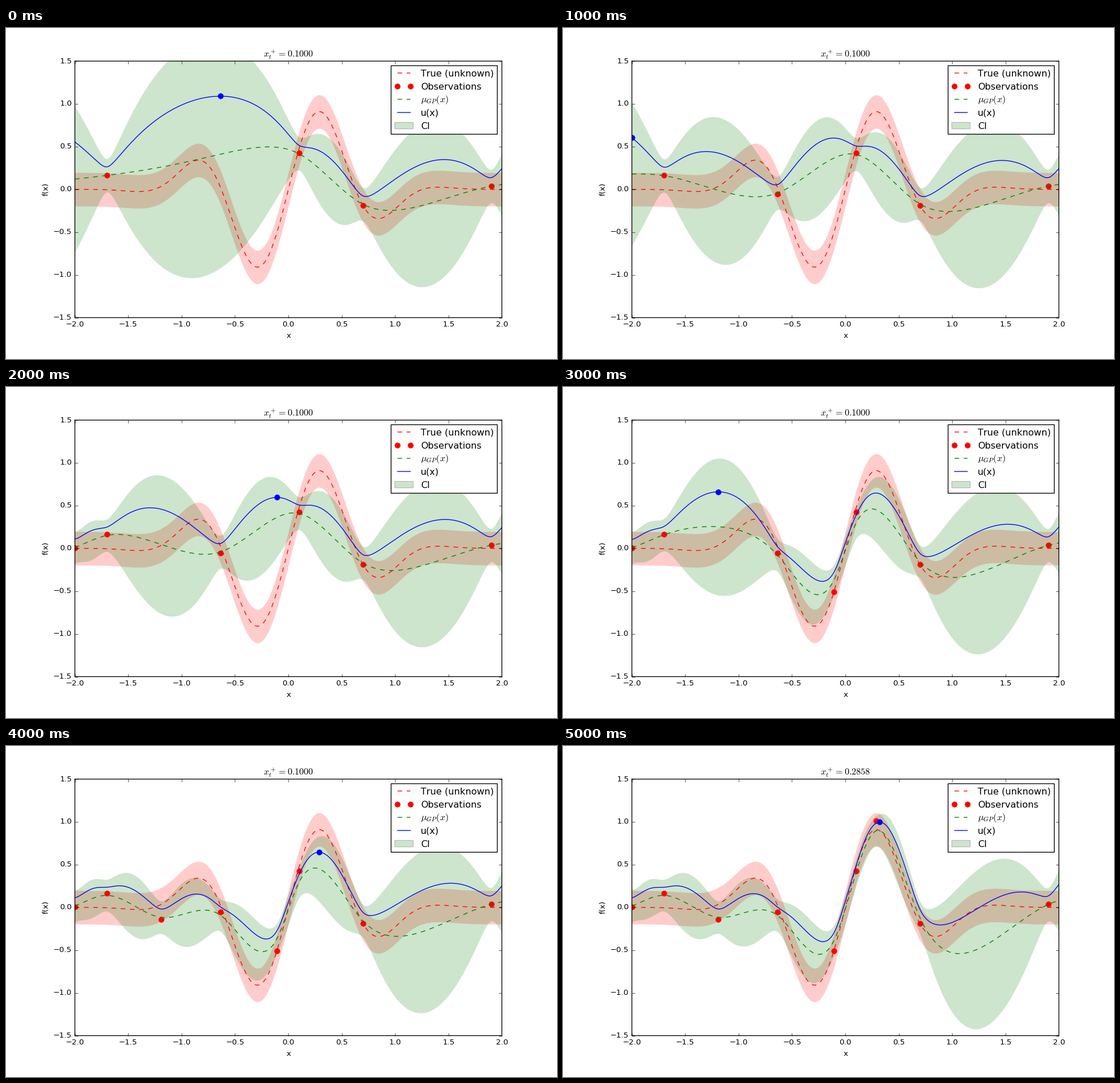
Recreate the animation shown at these times as a matplotlib script. Size 966 by 580 pixels, loop 6000 ms.

```python
import numpy as np
import matplotlib.pyplot as plt
from matplotlib.animation import FuncAnimation
from matplotlib.patches import Patch

W, H, DPI = 966, 580, 100
S = 0.9664  # a 10 x 6 inch layout shrunk to the stage
NOISE = 0.1
Z = 1.96

plt.style.use("classic")
rc = plt.rcParams
for key in ("axes.linewidth", "axes.titlepad", "axes.labelpad",
            "lines.linewidth", "lines.markeredgewidth", "patch.linewidth",
            "xtick.major.size", "ytick.major.size",
            "xtick.major.width", "ytick.major.width",
            "xtick.major.pad", "ytick.major.pad"):
    rc[key] *= S
rc.update({
    "font.size": 10 * S,
    "font.sans-serif": ["DejaVu Sans"],
    "text.kerning_factor": 6,
    "path.snap": False,
    "lines.dashed_pattern": [6 * S, 6 * S],
    "figure.facecolor": "white",
    "savefig.facecolor": "white",
    "savefig.dpi": "figure",
})

# Four initial samples, then the points picked by the acquisition curve.
START = 4
OBS_X = np.array([-1.7, 0.1, 0.7, 1.9, -0.636, -2.0, -0.108, -1.191, 0.2858])
OBS_Y = np.array([0.164, 0.428, -0.187, 0.040, -0.053, 0.002,
                  -0.506, -0.139, 1.011])
PICKS = np.append(OBS_X[START:], 0.322)

grid = np.linspace(-2, 2, 400)


def true_f(x):
    return np.sin(5 * x) * (1 - np.tanh(x ** 2))


def kernel(a, b):
    """Matern 3/2 with unit length scale."""
    r = np.sqrt(3) * np.abs(a[:, None] - b[None, :])
    return (1 + r) * np.exp(-r)


def posterior(xs, ys, x):
    cov = kernel(xs, xs) + NOISE ** 2 * np.eye(len(xs))
    cross = kernel(xs, x)
    weights = np.linalg.solve(cov, cross)
    var = 1 - np.sum(cross * weights, axis=0)
    return weights.T @ ys, np.sqrt(np.maximum(var, 0))


def band(lo, hi):
    return np.column_stack([np.append(grid, grid[::-1]),
                            np.append(lo, hi[::-1])])


fig = plt.figure(figsize=(W / DPI, H / DPI), dpi=DPI)
fig.subplots_adjust(left=0.125, right=0.9, bottom=0.125, top=0.9)
ax = fig.add_subplot()

truth = true_f(grid)
true_line, = ax.plot(grid, truth, "r--")
ax.fill_between(grid, truth - Z * NOISE, truth + Z * NOISE,
                color="r", alpha=0.2, lw=0)
obs, = ax.plot([], [], "r.", ms=14 * S)
mu_line, = ax.plot([], [], "g--")
u_line, = ax.plot([], [], "b-")
ci = ax.fill_between(grid, truth, truth, color="g", alpha=0.2, lw=0)
pick, = ax.plot([], [], "b.", ms=14 * S)

ax.set_xlim(-2, 2)
ax.set_ylim(-1.5, 1.5)
ax.set_xlabel("x")
ax.set_ylabel("f(x)")
legend = ax.legend([true_line, obs, mu_line, u_line,
                    Patch(fc="g", ec="k", alpha=0.2)],
                   ["True (unknown)", "Observations", " ", "u(x)", "CI"],
                   loc="upper right")
# The formula sits on a blank row so that all rows keep the same height.
size = 12 * S
ax.annotate(r"$\mu_{GP}(x)$", (0, 0), xycoords=legend.get_texts()[2],
            xytext=(0, 0.236 * size), textcoords="offset points",
            size=size, va="baseline", zorder=6)


def update(i):
    xs, ys = OBS_X[:START + i], OBS_Y[:START + i]
    mu, sd = posterior(xs, ys, grid)
    u = mu + sd
    obs.set_data(xs, ys)
    mu_line.set_data(grid, mu)
    u_line.set_data(grid, u)
    ci.set_verts([band(mu - Z * sd, mu + Z * sd)])
    pick.set_data([PICKS[i]], [np.interp(PICKS[i], grid, u)])
    ax.set_title(f"$x_t^+ = {xs[np.argmax(ys)]:.4f}$")
    return obs, mu_line, u_line, ci, pick


anim = FuncAnimation(fig, update, frames=len(PICKS), interval=1000,
                     repeat=True, repeat_delay=0, blit=False)
plt.show()
```
